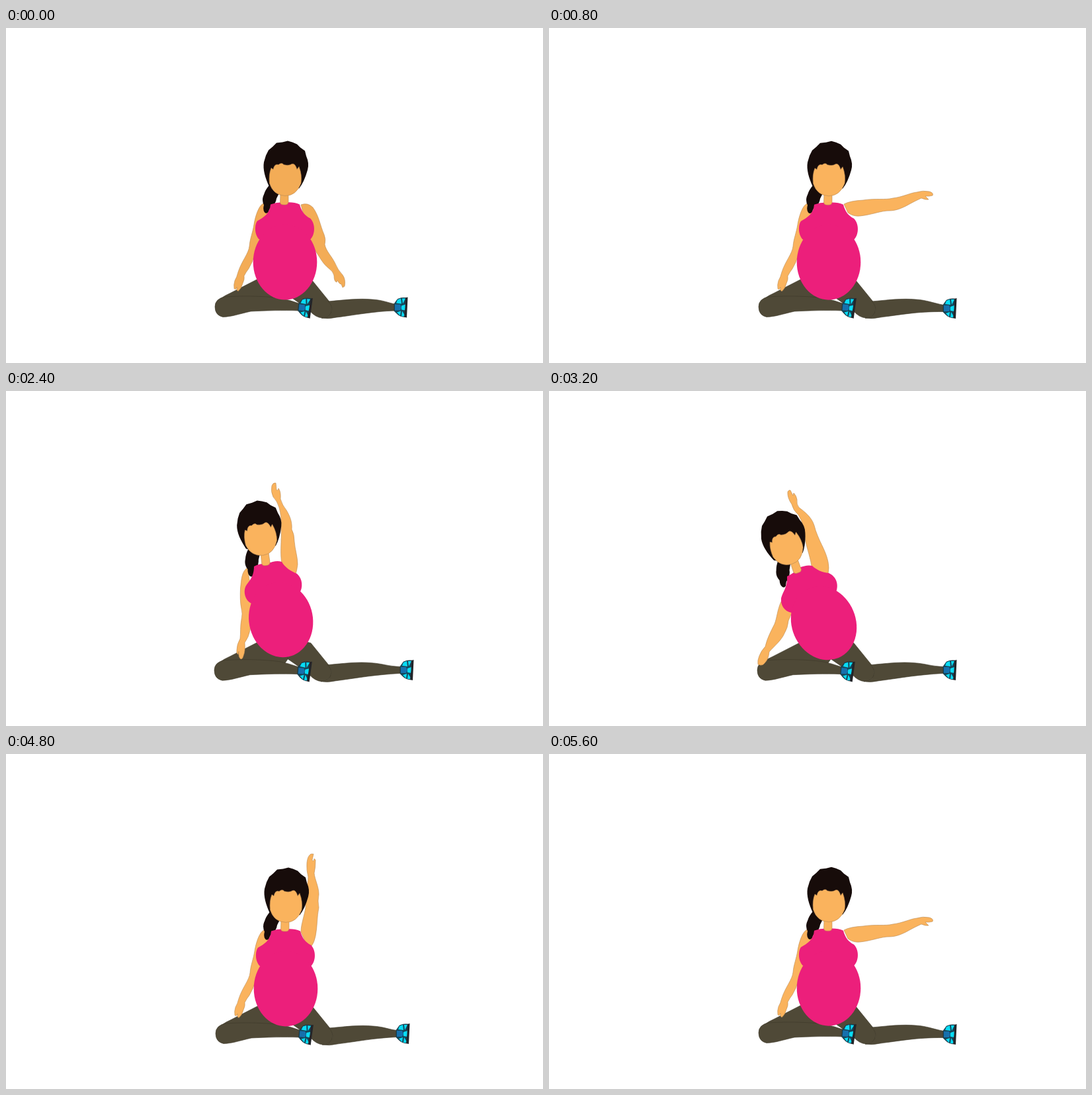
Write an HTML page that moves like this. It is 812 px wide and 506 px high and loops after 6.6 s.

```html
<!DOCTYPE html>
<html lang="en">
<head>
<meta charset="utf-8">
<title>Seated side stretch</title>
<style>
  html, body { margin: 0; width: 100%; height: 100%; overflow: hidden; background: #fff; }
  svg { display: block; width: 100%; height: 100%; }
  .skin { stroke: #b98a55; stroke-width: .6; stroke-linejoin: round; }
  .hair { fill: #170c0a; }
  .top { fill: #ec1f7b; }
  .leg { fill: #4f4937; stroke: #3d3829; stroke-width: .6; }
</style>
</head>
<body>
<svg id="stage" viewBox="0 0 812 506"></svg>
<script>
const LOOP = 6600;

const leftArm = {
  up: "M391,265 C383,268 378,285 376,297 C374,310 370,318 369,330 C368,341 357,353 352,369 Q350,377 347,382 Q345,388 346,394 Q348,397 350,392 Q349,397 352,398 Q357,394 359,386 Q362,380 361,375 Q364,369 368,364 Q374,354 377,343 L390,320 L400,280 Z",
  lean: "M365,267 C356,273 356,285 354.5,298 C354,308 354,320 356,329 Q358,336 356,345 C354,355 355,366 354,374 Q349,383 349,391 Q348,396 351,398 L352,393 Q351,402 355,405 Q358,405 359,400 Q362,393 361,380 Q367,372 369,361 L374,320 Z",
  deep: "M351,318 C345,331 345,342 341,352 C335,364 330,373 327,386 Q321,392 318,400 Q315,407 316,413 L319,414 Q324,415 327,410 Q332,405 333,394 C341,385 352,376 356,366 Q361,358 362,347 L368,333 Z"
};

const rightArm = {
  rest: "M446,267 Q456,263 464,271 C473,283 475,298 481,312 Q484,319 482,327 C484,337 492,344 497,354 Q502,366 509,373 Q514,380 512,390 L509,392 L507,387 Q504,387 501,381 L500,384 Q496,383 496,374 Q495,368 488,363 C479,356 475,347 470,340 L460,322 L452,290 Z",
  side: "M446,266 Q455,261 475,260 C493,257 509,260 520,257 C536,255 546,249 556,248 Q565,245 575,247 Q582,249 580,253 L575,254 L569,254 L574,259 Q570,260 563,257 Q554,261 545,266 C533,273 523,276 515,276 C501,276 489,282 470,284 Q460,285 452,279 Z",
  up: "M446,269 C446,257 451,245 453,232 C452,215 456,200 457,186 Q454,175 455,164 Q456,154 461,151 L465,151 L463,160 Q465,164 466,158 L468,160 Q468,172 466,180 C467,190 473,200 473,212 Q471,222 473,232 C470,246 471,260 468,275 Q466,285 462,290 L454,287 Z",
  lean: "M417,260 C414,244 417,226 416,210 Q417,190 413,176 Q410,166 404,160 Q400,152 402,143 Q404,138 408,139 L409,149 Q411,152 412,147 Q416,152 415,163 Q418,173 424,180 C430,190 433,199 432,209 Q436,216 436,227 C437,240 441,250 441,262 Q440,270 438,277 L422,272 Z",
  deep: "M397,264 C394,246 388,233 387,220 Q387,204 377,187 Q369,180 367,171 Q360,161 361,152 Q363,149 365,150 L369,158 L370,154 Q374,158 375,164 Q374,171 378,176 C386,182 397,190 401,203 Q403,211 406,218 C411,231 419,243 422,258 Q424,267 422,276 L405,275 Z"
};

const bust = {
  up: "M401,267 Q412,263 424,264 Q436,263 445,267 C448,278 453,284 461,288 C470,297 468,314 461,320 L384,320 C376,312 377,297 381,292 C390,287 400,281 401,267 Z",
  lean: "M375,265 Q385,260 395,261 Q408,255 417,258 C422,267 431,272 440,276 C449,284 449,297 444,305 L371,321 C361,316 359,303 362,296 C365,289 375,283 375,265 Z",
  deep: "M360,280 Q371,275 378,267 Q390,262 398,264 C404,270 413,274 423,275 C436,281 438,294 434,304 L367,335 C355,333 350,322 351,313 C353,304 361,296 360,280 Z"
};

// Shapes below are drawn upright; their pivots match the "up" lean
const tail = "M399,238 Q393,245 391,252 Q387,260 391,268 Q389,275 392,279 Q395,282 398,278 Q399,273 404,270 Q409,265 410,258 L414,250 L410,240 Z";
const hair = "M399,240 C393,227 389,214 391,203 L394,193 L398,185 L404,180 L410,174 L419,173 L427,171 L434,173 L441,176 L446,181 L453,186 L455,194 Q460,205 457,215 Q452,233 444,243 L434,235 L407,244 Z";
const face = "M402,212 L405,214 Q407,205 413,207 Q418,203 421,207 Q429,209 433,206 Q438,204 441,214 L444,210 Q449,223 447,235 Q440,254 423,254 Q405,253 399.5,235 Q398,222 402,212 Z";
const neck = "M416,250 L428,250 L428,264 Q427,268 422,267.5 Q416,268 415.5,264 Z";

// Pivot x, pivot y, tilt
const leans = {
  up: { belly: [423, 354, 0], head: [423, 230, 0], tail: [400, 240, 0], neck: [422, 259, 0] },
  lean: { belly: [415.7, 345.5, -11], head: [385, 224.5, -9], tail: [368, 240, -13], neck: [392.5, 255, -8] },
  deep: { belly: [415.5, 350.5, -23], head: [359.7, 238.7, -18], tail: [348.5, 256.5, -18], neck: [374, 266.5, -20] }
};

const poses = {
  rest: { lean: "up", arm: "rest", body: [-1, -.5], legs: [0, 0], foot: [0, 0], skin: "#f3ac56" },
  side: { lean: "up", arm: "side", body: [0, -.3], legs: [1, 0], foot: [8, 1.5] },
  up: { lean: "up", arm: "up", body: [0, .4], legs: [1, 1], foot: [2, -.5] },
  lean: { lean: "lean", arm: "lean", body: [0, 0], legs: [-1, .7], foot: [10, -1.2] },
  deep: { lean: "deep", arm: "deep", body: [0, 0], legs: [-1, .7], foot: [10, -1.2] }
};

const steps = [
  [0, "rest"], [800, "side"], [1600, "up"], [2400, "lean"],
  [3200, "deep"], [4000, "lean"], [4800, "up"], [5600, "side"]
];

const path = (d, attrs) => `<path d="${d}" ${attrs}/>`;
const group = (transform, body) => `<g transform="${transform}">${body}</g>`;
const move = ([x, y]) => `translate(${x} ${y})`;

function shoe(x, y, tilt) {
  return group(`translate(${x} ${y}) rotate(${tilt} 10 15)`,
    path("M0,9 L5,2 Q11,-1 18,0 L17,29 Q9,29 4,24 L0,20 Z", 'fill="#15465a" stroke="#173540" stroke-width=".6"') +
    path("M5,3 L10,1 L11,9 L3,8 Z M12,1 L17,1 L13,9 Z M4,22 L10,20 L9,27 Z M12,20 L17,28 L11,28 Z M11,12 L17,10 L17,19 L11,18 Z", 'fill="#08dcf5"') +
    path("M1,10 L9,10 L11,15 L9,19 L1,19 Z", 'fill="#1670ad"') +
    path("M17,0 L20.5,-1 L19,30 L15,29 Q17,15 17,0 Z", 'fill="#242529"'));
}

function legs(p) {
  const [fx, fy] = p.foot, ax = 588 + fx;
  const cls = 'class="leg"';
  return group(move(p.legs),
    path("M380,379.5 L340,400 Q322,408 318,416 L330,430 L421,413 L428,403 L430,370 Z", cls) +
    path("M462,380 L488,412 Q495,420 492,430 Q488,438 478,438 Q468,437 460,428 L440,413 L427,404 L425,370 Z", cls) +
    path(`M487,413 C510,411 532,408 554,410 C570,411 578,415 ${ax},${417 + fy} L${ax},${427 + fy} C555,428 525,434 500,437 Q488,440 477,438 Q489,438 492,429 Q495,420 487,413 Z`, cls) +
    path("M331,406 C360,404 392,405 415,408 Q429,411 443,416 L443,427 C420,426 389,427 370,428 C352,432 342,436 328,436.5 Q316,434 316,421 Q316,409 331,406 Z", cls) +
    shoe(442, 408, 5) + shoe(587 + fx, 407.5 + fy, 0));
}

function figure(name) {
  const p = poses[name], l = leans[p.lean];
  const skin = `class="skin" fill="${p.skin || "#fab35d"}"`;
  const place = (part, body) => {
    const [x, y, tilt] = l[part], [px, py] = leans.up[part];
    return group(`translate(${x} ${y}) rotate(${tilt}) translate(${-px} ${-py})`, body);
  };
  const body =
    path(leftArm[p.lean], skin) +
    place("tail", path(tail, 'class="hair"')) +
    path(bust[p.lean], 'class="top"') +
    place("belly", '<ellipse class="top" cx="423" cy="354" rx="48.3" ry="57"/>') +
    place("neck", path(neck, skin)) +
    place("head", path(hair, 'class="hair"') + path(face, skin));
  return `<g id="${name}" display="none">` + legs(p) + path(rightArm[p.arm], skin) + group(move(p.body), body) + "</g>";
}

const stage = document.getElementById("stage");
const names = Object.keys(poses);
stage.innerHTML = names.map(figure).join("");
const figures = names.map(n => document.getElementById(n));

const start = performance.now();
let shown = "";

function draw(now) {
  const t = Math.max(0, now - start) % LOOP;
  const name = steps.filter(s => s[0] <= t).pop()[1];
  if (name !== shown) {
    figures.forEach(f => f.setAttribute("display", f.id === name ? "inline" : "none"));
    shown = name;
  }
  requestAnimationFrame(draw);
}
draw(start);
</script>
</body>
</html>
```
